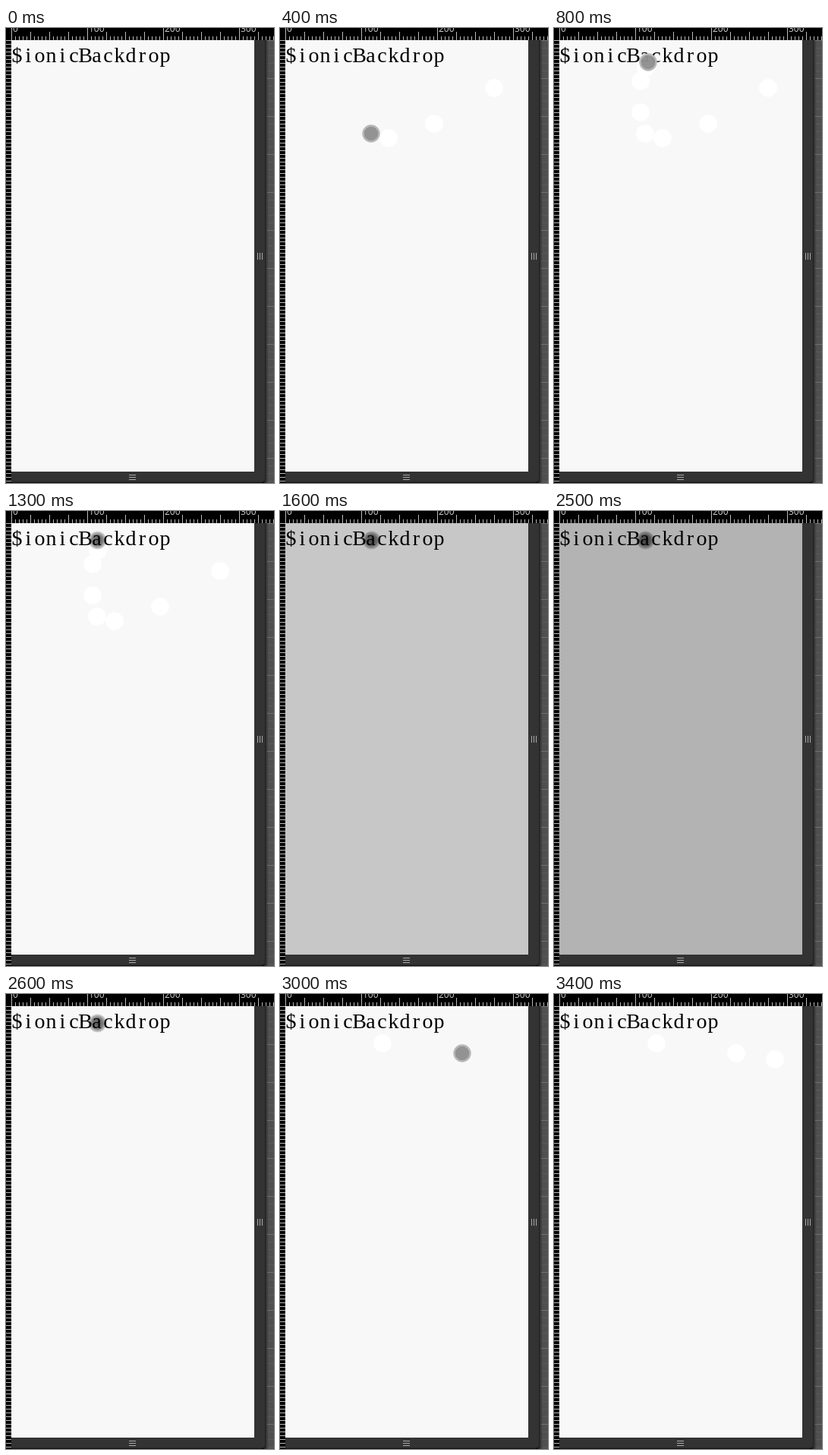
An HTML page for the animation above (3.8 s loop, 353 by 599 pixels).

```html
<!DOCTYPE html>
<html lang="en">
<head>
<meta charset="utf-8">
<title>Backdrop demo</title>
<style>
html, body { margin: 0; width: 100%; height: 100%; overflow: hidden; background: #000; }
svg { display: block; }
.ruler { font: 12px "Open Sans", sans-serif; fill: #ccc; }
#title { font: 28px "Liberation Serif", serif; text-anchor: middle; }
</style>
</head>
<body>
<svg width="353" height="599" viewBox="0 0 353 599">
  <defs>
    <linearGradient id="shade">
      <stop offset="0" stop-color="#1c1c1c"/>
      <stop offset=".45" stop-color="#505050"/>
    </linearGradient>
    <radialGradient id="press">
      <stop offset="0" stop-color="#000" stop-opacity=".66"/>
      <stop offset=".6" stop-color="#000" stop-opacity=".5"/>
      <stop offset="1" stop-color="#000" stop-opacity=".12"/>
    </radialGradient>
  </defs>
  <rect width="353" height="599"/>
  <rect x="340" y="16" width="13" height="583" fill="url(#shade)"/>
  <path id="grid" stroke="#5a5a5a"/>
  <path id="gridMajor" stroke="#707070"/>
  <path d="M7 16H342V593a5 5 0 0 1-5 5H7Z" fill="#333"/>
  <path d="M341.5 16V593a5 5 0 0 1-5 5H7" fill="none" stroke="#222"/>
  <path d="M331.5 296v9m3-9v9m3-9v9M162 588.5h9m-9 3h9m-9 3h9" stroke="#aaa"/>
  <path id="ticks" stroke="#bbb"/>
  <g id="labels" class="ruler"></g>
  <rect x="7" y="16" width="320" height="568" fill="#f8f8f8"/>
  <g id="trail" fill="#fff"></g>
  <rect id="backdrop" x="7" y="16" width="320" height="568"/>
  <text id="title" y="45">$ionicBackdrop</text>
  <g id="cursor">
    <circle id="idle" r="10.5" fill="#8f8f8f" fill-opacity=".97" stroke="#b8b8b8" stroke-width="2.4"/>
    <circle id="held" r="12" fill="url(#press)"/>
  </g>
</svg>
<script>
const LOOP = 3800, STEP = 100;
const $ = id => document.getElementById(id);

// Pointer positions, one per step from the start time
const arrive = { start: 100, path: [[282, 79], [203, 126], [143, 145], [120, 139], [114, 111], [114, 70],
  [121, 52], [124, 45], [125, 41], [123, 39], [121, 39], [120.5, 38.5]] };
const leave = { start: 2800, path: [[120.5, 38.5], [135, 65], [240, 78], [291, 86], [339, 91], [357, 80.5]] };

function buildScene() {
  let ticks = '', grid = '', major = '';
  for (let x = 0; x < 346; x += 5) {
    const top = x % 100 == 0 ? 0 : x % 25 == 0 ? 5 : 11;
    ticks += `M${x + 7.5} ${top}V16`;
  }
  for (let y = 0; y < 583; y += 5) {
    ticks += `M0 ${y + 16.5}H7`;
    if (y % 50 == 0) major += `M344 ${y + 16.5}H353`;
    else if (y % 10 == 0) grid += `M345 ${y + 16.5}H353`;
  }
  $('ticks').setAttribute('d', ticks);
  $('grid').setAttribute('d', grid);
  $('gridMajor').setAttribute('d', major);
  $('labels').innerHTML = [0, 100, 200, 300].map(n => `<text x="${n + 9}" y="5">${n}</text>`).join('');
  // Fixed-pitch lettering
  $('title').setAttribute('x', [...$('title').textContent].map((_, i) => 14.5 + 15 * i).join(' '));
}

function backdropAlpha(t) {
  if (t < 1600 || t >= 2600) return 0;
  return t < 1700 ? 0.2 : t < 2500 ? 0.383 : 0.278;
}

function draw(now) {
  const t = Math.floor(now % LOOP / STEP) * STEP;
  const move = t < leave.start ? arrive : leave;
  const step = (t - move.start) / STEP;
  const last = move.path.length - 1;
  const visible = step >= 0 && (move == arrive || step <= last);
  const held = t >= 1300 && t < 2800;

  // The pointer leaves pale spots until the page is repainted
  const spots = t >= 1600 && t < 2800 ? [] : move.path.slice(move == leave ? 1 : 0, Math.max(0, step));
  $('trail').innerHTML = spots.filter(p => p[0] < 315)
    .map(([x, y]) => `<circle cx="${x}" cy="${y}" r="11.8"/>`).join('');

  $('cursor').style.display = visible ? '' : 'none';
  if (visible) $('cursor').setAttribute('transform', `translate(${move.path[Math.min(step, last)]})`);
  $('idle').style.display = held ? 'none' : '';
  $('held').style.display = held ? '' : 'none';
  $('backdrop').setAttribute('fill-opacity', backdropAlpha(t));
}

buildScene();
const begin = performance.now();
function tick() {
  draw(performance.now() - begin);
  requestAnimationFrame(tick);
}
tick();
</script>
</body>
</html>
```
